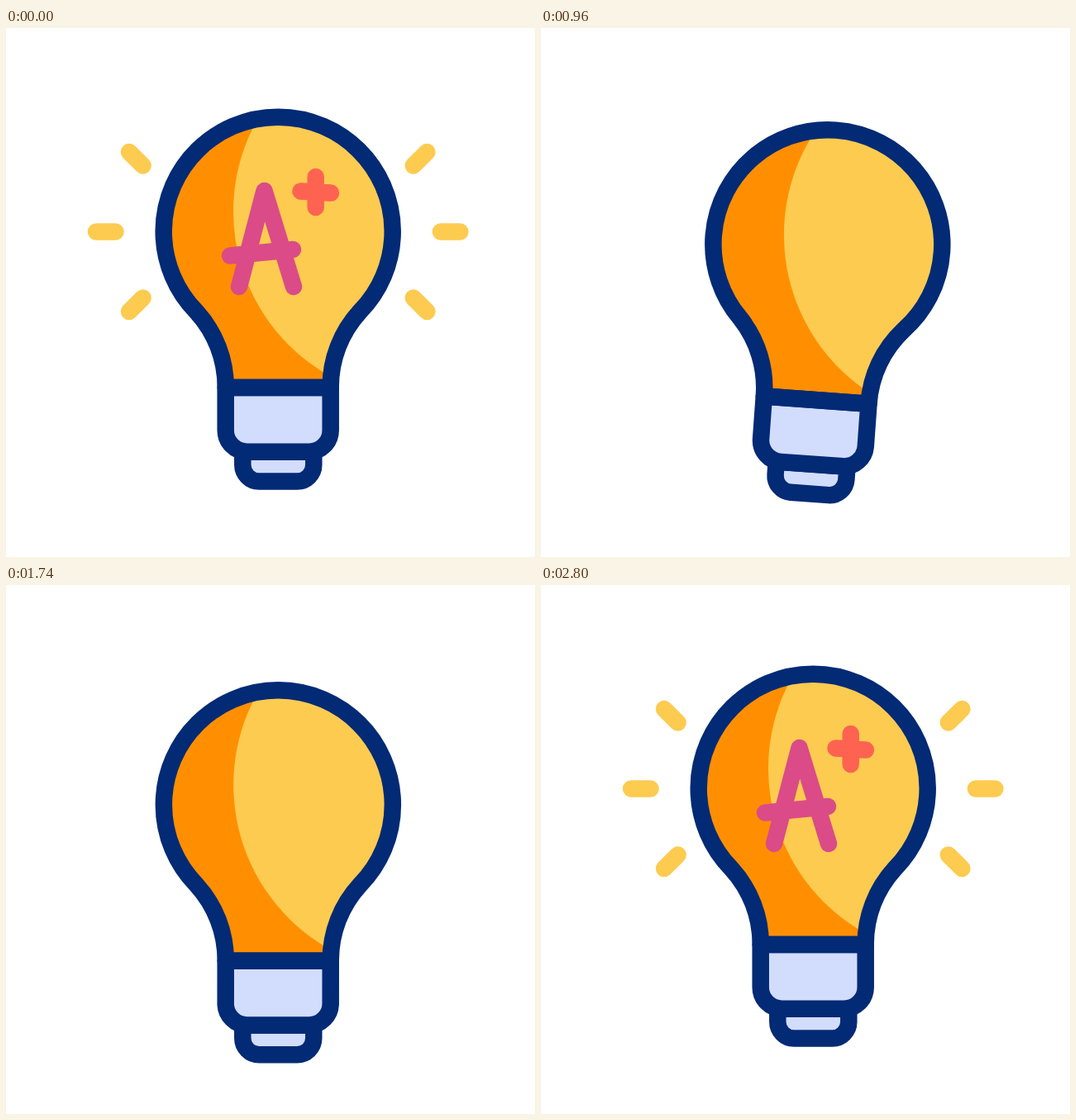
Write an HTML page that moves like this. It is 640 by 640 pixels and loops after 3020 ms.

```html
<!DOCTYPE html>
<html lang="en">
<head>
<meta charset="utf-8">
<title>Bright idea</title>
<style>
  html, body { margin: 0; height: 100%; overflow: hidden; background: #fff; }
  svg { display: block; width: 100vw; height: 100vh; }
  .line { fill: none; stroke-width: 20.5; stroke-linecap: round; stroke-linejoin: round; }
</style>
</head>
<body>
<svg viewBox="0 0 640 640">
  <defs>
    <path id="glass" d="M265.7 435A135 135 0 0 0 230.2 343A138.5 138.5 0 1 1 428.2 343A135 135 0 0 0 392.7 435Z"/>
    <clipPath id="inside"><use href="#glass"/></clipPath>
  </defs>
  <path id="rays" class="line" stroke="#fdcb50"/>
  <g id="bulb">
    <use href="#glass" fill="#ff8f00"/>
    <circle cx="503" cy="222" r="228" fill="#fdcb50" clip-path="url(#inside)"/>
    <g id="grade" class="line">
      <path stroke="#db4b87" d="M282 313L312.5 197L348 313M271 275.5L347 268"/>
      <path stroke="#fe6352" d="M374.7 180V217M356.5 197.5L393 199.5"/>
    </g>
    <g stroke="#022a75" stroke-width="20.5" stroke-linejoin="round" fill="#d2dcfd">
      <path d="M286.3 512.7V528.6a20 20 0 0 0 20 20H352.3a20 20 0 0 0 20-20V512.7Z"/>
      <path d="M265.7 435V486.7a26 26 0 0 0 26 26H366.7a26 26 0 0 0 26-26V435Z"/>
      <use href="#glass" fill="none"/>
    </g>
  </g>
</svg>
<script>
const LOOP = 3020, START = 200, BEAT = 440, BEATS = 5, RETURN = 2600, RETURN_TIME = 200;
const CENTER = 329.2, RAY = 23.5;
const $ = id => document.getElementById(id);

const clamp = (v, max = 1) => Math.min(Math.max(v, 0), max);
const ease = p => (1 - Math.cos(Math.PI * p)) / 2;

const home = { x: 0, y: 0, angle: 0 };
const dip = { x: 0, y: 25.5, angle: 0 };
const lean = side => ({ x: 14.1 * side, y: 19.75 - 6.4 * side, angle: 5 * side });

// The bulb dips once, then leans right and left in turn
const poseAt = beat => beat === 0 ? home : beat === 1 ? dip : lean(beat % 2 ? -1 : 1);

function blend(a, b, p) {
  const mix = key => a[key] + (b[key] - a[key]) * ease(p);
  return { x: mix("x"), y: mix("y"), angle: mix("angle") };
}

// Three rays on each side, shrinking towards their outer ends
function rayPath(size) {
  let d = "";
  if (size <= 0) return d;
  for (const side of [-1, 1]) {
    for (const row of [-1, 0, 1]) {
      const slant = row * Math.PI / 4;
      const x = CENTER + side * (220.2 - 40 * Math.abs(row));
      const y = 246.5 + 96.5 * row;
      d += `M${x} ${y}l${-side * RAY * size * Math.cos(slant)} ${-RAY * size * Math.sin(slant)}`;
    }
  }
  return d;
}

function draw(t) {
  const beat = clamp((t - START) / BEAT, BEATS);
  const step = Math.min(Math.floor(beat), BEATS - 1);
  const back = clamp((t - RETURN) / RETURN_TIME);
  const sway = blend(poseAt(step), poseAt(step + 1), beat - step);
  const { x, y, angle } = blend(sway, home, back);
  const light = Math.max(1 - beat, back);

  $("bulb").setAttribute("transform", `translate(${x} ${y}) rotate(${angle} ${CENTER} 328)`);
  $("grade").setAttribute("opacity", light);
  $("rays").setAttribute("d", rayPath(ease(light)));
}

const begin = performance.now();
function tick() {
  draw((performance.now() - begin) % LOOP);
  requestAnimationFrame(tick);
}
tick();
</script>
</body>
</html>
```
